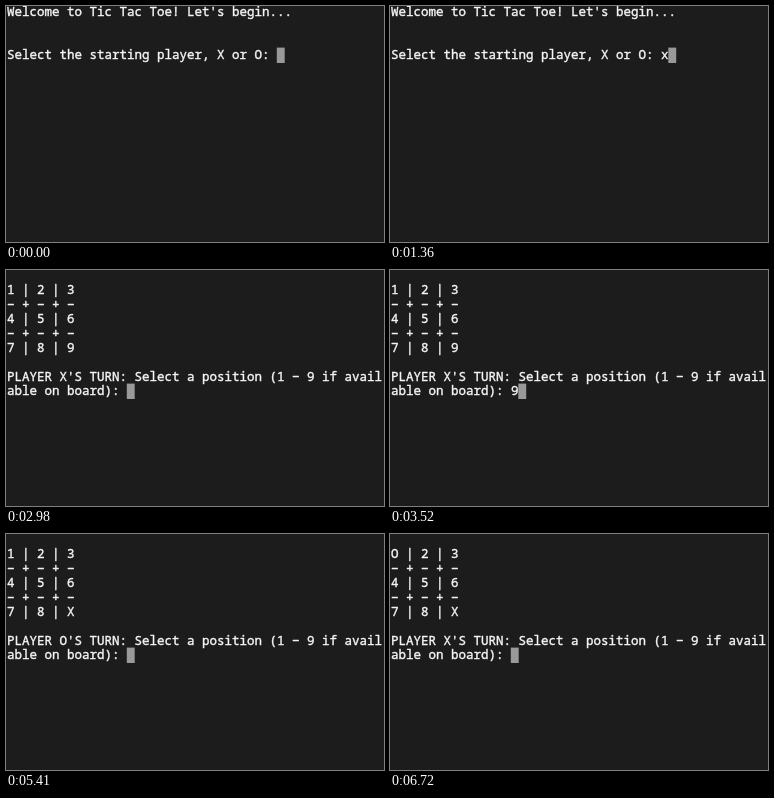
Write an HTML page with a canvas that moves like this. It is 378 px wide and 236 px high and loops after 8 s.

```html
<!DOCTYPE html>
<html lang="en">
<head>
<meta charset="utf-8">
<title>Tic Tac Toe in a terminal</title>
<style>
  html, body { margin: 0; width: 100%; height: 100%; overflow: hidden; background: #1c1c1c; }
  canvas { display: block; width: 378px; height: 236px; }
</style>
</head>
<body>
<canvas id="stage" width="378" height="236"></canvas>
<script>
const ctx = document.getElementById("stage").getContext("2d");
const LOOP = 8000;
const CELL = 7.5, ROW = 14.4, LEFT = 1, BASELINE = 10;

const intro = typed => [
  "Welcome to Tic Tac Toe! Let's begin...", "", "",
  "Select the starting player, X or O: " + typed
];

// The minus sign gives the wide, centred dash of the terminal font.
const turn = (player, cells, typed) => {
  const rule = "\u2212 + \u2212 + \u2212";
  const line = i => [...cells.slice(i, i + 3)].join(" | ");
  return [
    "", line(0), rule, line(3), rule, line(6), "",
    `PLAYER ${player}'S TURN: Select a position (1 \u2212 9 if avail`,
    "able on board): " + typed
  ];
};

const screens = [
  { at: 0, lines: intro("") },
  { at: 1360, lines: intro("x") },
  { at: 2160, lines: turn("X", "123456789", "") },
  { at: 3520, lines: turn("X", "123456789", "9") },
  { at: 4640, lines: turn("O", "12345678X", "") },
  { at: 5920, lines: turn("O", "12345678X", "1") },
  { at: 6720, lines: turn("X", "O2345678X", "") }
];

function draw(lines) {
  ctx.fillStyle = "#1c1c1c";
  ctx.fillRect(0, 0, 378, 236);

  const last = lines.length - 1;
  ctx.fillStyle = "#999";
  ctx.fillRect(LEFT + lines[last].length * CELL - 0.2, last * ROW - 1.6, CELL + 0.4, 15.4);

  // A thin outline thickens the letters to a medium weight.
  ctx.font = "500 12.5px 'Noto Sans Mono', 'DejaVu Sans Mono', monospace";
  ctx.fillStyle = ctx.strokeStyle = "#f6f6f6";
  ctx.lineWidth = 0.4;
  ctx.lineJoin = "round";
  lines.forEach((text, i) => {
    const y = BASELINE + i * ROW;
    ctx.fillText(text, LEFT, y);
    ctx.strokeText(text, LEFT, y);
  });
}

const start = performance.now();
function tick() {
  const t = (performance.now() - start) % LOOP;
  draw(screens.findLast(s => s.at <= t).lines);
  requestAnimationFrame(tick);
}
tick();
</script>
</body>
</html>
```
